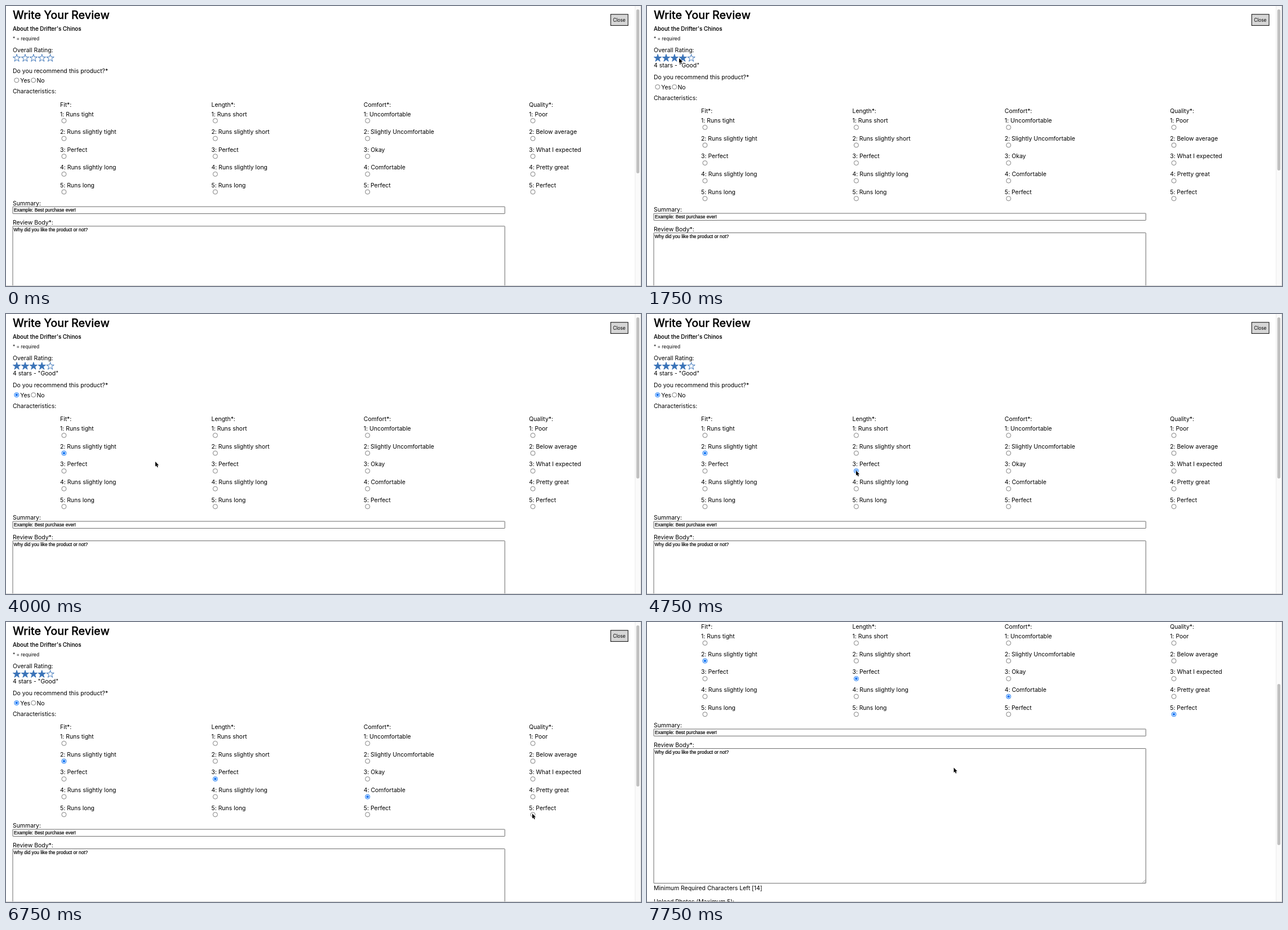
An HTML page that plays this animation: 1127x497 px, repeating every 8000 ms.

```html
<!DOCTYPE html>
<html lang="en">
<head>
<meta charset="utf-8">
<title>Write Your Review</title>
<style>
  html, body { margin: 0; width: 100%; height: 100%; overflow: hidden; background: #fff; }
  svg { display: block; }
  text { font: 10.45px Inter, sans-serif; font-feature-settings: "calt" 0; fill: #000; white-space: pre; }
  .title { font-size: 19.75px; font-weight: 500; stroke: #000; stroke-width: .3; stroke-linejoin: round; }
  .sub { font-size: 9.8px; font-weight: 500; stroke: #000; stroke-width: .1; }
  .small { font-size: 8.3px; }
  .field { font: 8.25px "Liberation Sans", Arial, sans-serif; stroke: #000; stroke-width: .2; }
  .box { fill: #fff; stroke: #6a6a6a; }
  .star { fill: #fff; stroke: #3a73b8; stroke-width: 1; }
  .star.on { fill: #3a73b8; }
  .ring { fill: #fff; stroke: #707070; stroke-width: .9; }
  .dot { fill: none; }
  .on .ring { stroke: #0b72f5; stroke-width: 1; }
  .on .dot { fill: #0b72f5; }
</style>
</head>
<body>
<svg id="stage" width="1127" height="497" viewBox="0 0 1127 497"></svg>
<script>
const LOOP = 8000, STEP = 250;
const SHIFT = 11.8, SCROLL = 178;
const RATED = 1750, SCROLLED = 7750;

// One pointer position per step, starting at 500 ms
const POINTER_START = 500;
const POINTER = [
  [186, 80], [130, 88], [76, 94], [52, 94], [57, 92.5],
  [57, 92.5], [54, 98], [40, 120], [21, 139], [19, 143],
  [19, 143], [60, 195], [102, 246], [102, 246], [265, 262],
  [320, 270], [371, 278], [371, 278], [530, 298], [702, 314],
  [646, 314], [641, 314], [641, 312], [760, 320], [899, 327],
  [934, 340], [934, 341], [775, 300], [585.5, 262], [544.5, 258.5]
];

const COLUMNS = [
  { x: 96, name: 'Fit', pick: 2, at: 3750,
    rows: ['Runs tight', 'Runs slightly tight', 'Perfect', 'Runs slightly long', 'Runs long'] },
  { x: 364.5, name: 'Length', pick: 3, at: 4750,
    rows: ['Runs short', 'Runs slightly short', 'Perfect', 'Runs slightly long', 'Runs long'] },
  { x: 634.8, name: 'Comfort', pick: 4, at: 6000,
    rows: ['Uncomfortable', 'Slightly Uncomfortable', 'Okay', 'Comfortable', 'Perfect'] },
  { x: 928.2, name: 'Quality', pick: 5, at: 7000,
    rows: ['Poor', 'Below average', 'What I expected', 'Pretty great', 'Perfect'] }
];

const stage = document.getElementById('stage');
const switches = [];

function add(parent, tag, attrs = {}, content = '') {
  const el = document.createElementNS('http://www.w3.org/2000/svg', tag);
  for (const key in attrs) el.setAttribute(key, attrs[key]);
  el.textContent = content;
  parent.append(el);
  return el;
}

const label = (parent, x, y, content, cls = '') =>
  add(parent, 'text', { x, y, class: cls }, content);

const rect = (parent, x, y, width, height, attrs) =>
  add(parent, 'rect', { x, y, width, height, ...attrs });

function switchOn(el, at) {
  switches.push({ el, at });
}

function radio(parent, cx, cy, at) {
  const g = add(parent, 'g');
  add(g, 'circle', { cx, cy, r: 4, class: 'ring' });
  add(g, 'circle', { cx, cy, r: 2.3, class: 'dot' });
  if (at) switchOn(g, at);
}

function star(parent, cx, cy, at) {
  const points = Array.from({ length: 10 }, (_, i) => {
    const r = i % 2 ? 2.7 : 7, a = Math.PI * (i / 5 - .5);
    return (cx + r * Math.cos(a)).toFixed(2) + ',' + (cy + r * Math.sin(a)).toFixed(2);
  });
  const el = add(parent, 'polygon', { points: points.join(' '), class: 'star' });
  if (at) switchOn(el, at);
}

const page = add(stage, 'g');
label(page, 12, 23.3, 'Write Your Review', 'title');
label(page, 12, 44.2, "About the Drifter's Chinos", 'sub');
label(page, 12, 61, '* = required', 'small');
rect(page, 1073.2, 14.8, 30.8, 19.8, { fill: '#d6d6d6', stroke: '#000' });
label(page, 1077.2, 28, 'Close', 'small');
label(page, 12, 82, 'Overall Rating:');
for (let i = 0; i < 5; i++) star(page, 19.1 + i * 14.87, 92.6, i < 4 && RATED);
const verdict = label(page, 12, 108.6, '4 stars - "Good"');

// Everything below the rating moves down once the verdict appears
const form = add(page, 'g');
label(form, 12, 118.6, 'Do you recommend this product?*');
radio(form, 18.8, 131.8, 3000);
label(form, 25.2, 135.8, 'Yes');
radio(form, 48.7, 131.8);
label(form, 54.5, 135.8, 'No');
label(form, 12, 155.2, 'Characteristics:');

for (const { x, name, pick, at, rows } of COLUMNS) {
  label(form, x, 178.6, name + '*:');
  rows.forEach((row, i) => {
    const y = 191.7 + i * 31.6, n = i + 1;
    label(form, x, y + 3.8, n + ': ' + row);
    radio(form, x + 6.9, y + 11.9, n === pick && at);
  });
}

label(form, 12, 353.6, 'Summary:');
rect(form, 12, 356.2, 873.3, 12.4, { class: 'box', rx: .5 });
label(form, 14, 365.3, 'Example: Best purchase ever!', 'field');
label(form, 12, 388.2, 'Review Body*:');
rect(form, 12, 390.8, 873.3, 239.2, { class: 'box', rx: .5 });
label(form, 13.5, 400, 'Why did you like the product or not?', 'field');
add(form, 'path', { d: 'M879.5 629l5-5M882.5 629l2-2', stroke: '#777', 'stroke-width': .7 });
label(form, 12, 642.2, 'Minimum Required Characters Left [14]');
label(form, 12, 666, 'Upload Photos (Maximum 5):');

rect(stage, 1116, 0, 11, 497, { fill: '#fafafa' });
rect(stage, 1116, 0, 1, 497, { fill: '#ececec' });
rect(stage, 1126, 0, 1, 497, { fill: '#dedede' });
const thumb = rect(stage, 1118.7, 6, 5.4, 291, { rx: 2.7, fill: '#c1c1c1' });
rect(stage, 0, 496, 1127, 1, { fill: '#cfcfcf' });

const pointer = add(stage, 'path', {
  d: 'M0 0V8.8L2 7L3.4 10.2L4.9 9.6L3.5 6.4H6.2Z',
  stroke: '#fff', 'stroke-width': 1.2, 'stroke-linejoin': 'round', 'paint-order': 'stroke'
});

const show = (el, on) => el.setAttribute('visibility', on ? 'visible' : 'hidden');
const move = (el, x, y) => el.setAttribute('transform', `translate(${x} ${y})`);

function render(t) {
  const rated = t >= RATED, scrolled = t >= SCROLLED;
  switches.forEach(({ el, at }) => el.classList.toggle('on', t >= at));
  show(verdict, rated);
  move(form, 0, rated ? SHIFT : 0);
  move(page, 0, scrolled ? -SCROLL : 0);
  thumb.setAttribute('y', scrolled ? 110 : 6);
  thumb.setAttribute('height', rated ? 286 : 291);

  const i = Math.floor((t - POINTER_START) / STEP);
  show(pointer, i >= 0);
  if (i >= 0) move(pointer, ...POINTER[Math.min(i, POINTER.length - 1)]);
}

const start = performance.now();
function tick() {
  render((performance.now() - start) % LOOP);
  requestAnimationFrame(tick);
}
tick();
</script>
</body>
</html>
```
